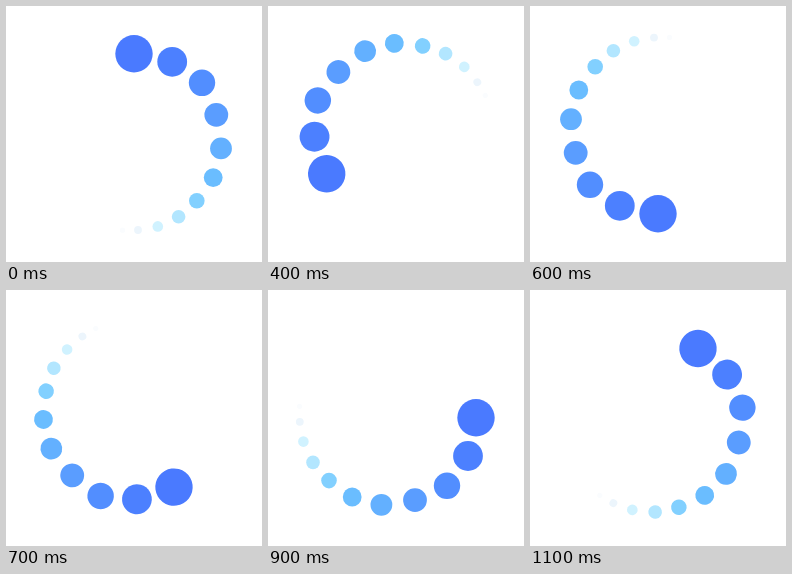
These frames come from a looping animation (256x256 px, 1.2 s). An HTML page:

```html
<!DOCTYPE html>
<html lang="en">
<head>
<meta charset="utf-8">
<title>Spinner</title>
<style>
  html, body { margin: 0; width: 100%; height: 100%; overflow: hidden; background: #fff; }
  svg { display: block; width: 100vw; height: 100vh; }
</style>
</head>
<body>
<svg viewBox="0 0 256 256"><g id="ring"></g></svg>
<script>
  const CENTER = [128, 127.8];
  const STEPS = 12, STEP_MS = 100;

  // x and y from the centre, radius, colour; head first
  const dots = [
    [0, -80, 18.7, '#4a7aff'],
    [38.2, -72, 14.9, '#4c80ff'],
    [68, -51, 13.2, '#528eff'],
    [82.3, -19, 11.9, '#5a9dff'],
    [87, 14.6, 10.9, '#63b0ff'],
    [79.2, 43.8, 9.4, '#6abdff'],
    [62.8, 67, 7.8, '#82d0ff'],
    [44.6, 83, 6.8, '#b2e6ff'],
    [23.8, 92.6, 5.3, '#d0f2ff'],
    [4, 96.2, 3.9, '#ecf5fc'],
    [-11.5, 96.4, 2.6, '#fafcfe']
  ];

  const ring = document.getElementById('ring');
  for (const [cx, cy, r, fill] of dots) {
    const dot = document.createElementNS('http://www.w3.org/2000/svg', 'circle');
    for (const [key, value] of Object.entries({ cx, cy, r, fill })) dot.setAttribute(key, value);
    ring.append(dot);
  }

  const start = performance.now();
  function draw(now) {
    const step = Math.floor(Math.max(0, now - start) / STEP_MS) % STEPS;
    ring.setAttribute('transform', `translate(${CENTER}) rotate(${-step * 360 / STEPS})`);
    requestAnimationFrame(draw);
  }
  draw(start);
</script>
</body>
</html>
```
